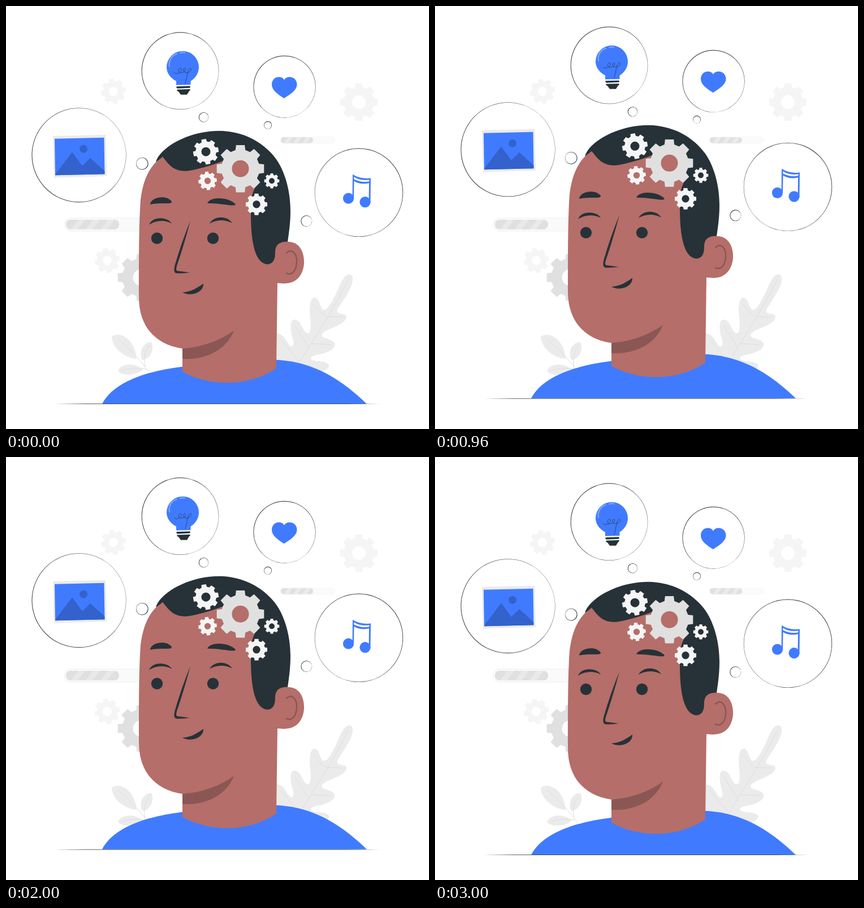
Write an HTML page that moves like this. It is 748x748 px and loops after 3.04 s.

```html
<!DOCTYPE html>
<html lang="en">
<head>
<meta charset="utf-8">
<title>Thinking head</title>
<style>
  html, body { margin: 0; width: 100%; height: 100%; overflow: hidden; background: #fff; }
  svg { display: block; width: 100vw; height: 100vh; }
  .ink { fill: #263238; }
  .blue { fill: #407bff; }
  .skin { fill: #b56e69; }
  .shade { fill: #8a5754; }
  .pale { fill: #f5f5f5; }
  .mid { fill: #e0e0e0; }
  .leaf { fill: #ebebeb; }
  .vein { fill: none; stroke: #dedede; stroke-width: 1; }
</style>
</head>
<body>
<svg viewBox="0 0 748 748" xmlns="http://www.w3.org/2000/svg">
  <defs>
    <clipPath id="clipLarge"><rect x="106" y="378" width="94" height="17" rx="8"/></clipPath>
    <clipPath id="clipSmall"><rect x="486" y="232" width="57" height="10.500" rx="5"/></clipPath>
  </defs>

  <g id="backGears"></g>

  <g>
    <rect x="103" y="375" width="170" height="23" rx="11" fill="#fafafa" stroke="#f0f0f0"/>
    <g clip-path="url(#clipLarge)">
      <rect class="mid" x="106" y="378" width="94" height="17"/>
      <path class="leaf" fill-opacity=".8" d="M115 395l13-17h12l-13 17zM141 395l13-17h12l-13 17zM167 395l13-17h12l-13 17z"/>
    </g>
    <rect x="485" y="230.500" width="97" height="13.500" rx="6.700" fill="#fafafa"/>
    <g clip-path="url(#clipSmall)">
      <rect class="mid" x="486" y="232" width="57" height="11"/>
      <path class="leaf" d="M491 243l8-11h8l-8 11zM507 243l8-11h8l-8 11zM523 243l8-11h8l-8 11z"/>
    </g>
  </g>

  <g>
    <path class="leaf" d="M231 624C207 622 187 602 187 585C196 575 228 584 231 624Z
      M241 626C234 612 242 595 257 594C263 606 256 625 241 626Z
      M242 643C226 629 203 633 198 645C204 655 230 654 242 643Z"/>
    <path class="vein" d="M253 647C238 628 218 604 197 589M246 639C242 622 247 609 254 600M248 642C232 639 216 641 205 645"/>
    <path class="leaf" d="M470 650V578C488 577 492 585 499 597C506 607 511 600 507 588C502 572 502 558 508 555
      C521 552 523 572 531 578C539 582 540 568 538 553C536 535 537 518 544 516C555 514 554 533 561 537
      C569 539 576 523 583 510C592 491 596 477 605 475C612 474 614 479 613 486C611 500 597 519 587 535
      C582 545 591 543 600 546C604 550 601 556 595 560C581 570 560 573 558 582C558 589 575 587 581 596
      C584 604 572 612 559 615C545 618 537 619 540 625C546 630 564 626 571 634C573 643 560 646 545 650Z"/>
    <path class="vein" d="M606 482C583 530 550 580 514 638M565 549L543 527M535 603L511 566M566 549L594 550M540 597L575 599M518 628L486 590"/>
  </g>

  <g id="floating">
    <g id="bubbles"></g>

    <g>
      <path class="blue" d="M301 140V133C291 128 284 119 284 108.500A28.500 28.500 0 0 1 341 108.500C341 119 335 128 326.500 133V139.500Z"/>
      <path d="M289 107C287 96 294 87 302 85M308 83.500Q312 82 316 83" fill="none" stroke="#7aa2ff" stroke-width="2.400" stroke-linecap="round"/>
      <path d="M317 138L321 119C323 108 329 109 327 114C324 119 314 121 314 113C316 107 320 112 316 116C309 121 303 118 306 112C309 108 313 113 308 117Q302 122 297 118" fill="none" stroke="#263238" stroke-width=".65"/>
      <path class="ink" d="M302 142.500L325 141.800Q327 143 325 145L303 146Q300 144 302 142.500ZM303 148L325 147.300Q327 149 324 150.500L320 157H309L305 151.500Q301 150 303 148Z"/>
    </g>

    <path class="blue" d="M491.800 163.500C480 156 470 149 470 139C470 125 487 122 492 131C497 122 514.500 125 514.500 139C514.500 149 503 156 491.800 163.500Z"/>

    <path fill="#ebebeb" d="M83 230L176.500 228L178 301L85 304Z"/>
    <path class="blue" d="M86 235L173.500 233L174.500 297.500L87 299.500Z"/>
    <g fill="#3362cc">
      <circle cx="137" cy="253" r="7"/>
      <path d="M87 299.500V298L117 258.500L135 283L149 269L174.400 292V297.500Z"/>
    </g>

    <g class="blue">
      <circle cx="605.500" cy="340.500" r="9.600"/>
      <circle cx="635" cy="347" r="9.600"/>
      <path d="M613 298Q627 307 645 304.500L644.500 348H641.500L642 313.500Q627 317 615.500 310L615 341H612.500ZM615.300 302.500V306.500Q628 313 642.200 310.500L642.400 307.500Q627 310 615.300 302.500Z" fill-rule="evenodd"/>
    </g>

    <path class="blue" d="M170 704C187 670 238 647 312 638L478 626C537 629 585 653 638 704Z"/>

    <path class="skin" d="M277 267C254 281 242 309 238 343C235 385 235 445 235 515C235 566 263 599 312 606V647C360 674 430 674 478 641L480 490L490 400L460 270L380 240Z"/>
    <path class="shade" d="M312 606C350 603 380 591 403 574C391 607 354 627 312 624Z"/>
    <path class="ink" d="M265 276C271 253 319 221 378 221C421 222 455 241 477 270C495 295 503 331 503 362C503 386 500 403 497 425L476 437C476 451 470 457 462 457C440 455 433 417 433 368C430 350 434 336 440 322L438 268L398 267C387 275 338 291 318 292C294 293 285 276 277 267Q271 272 265 276Z"/>
    <path class="skin" d="M476 440C475 423 482 417 498 417C518 417 528 434 527 456C525 479 511 492 490 491L478 490Z"/>
    <path d="M496 437C506 428 515 439 514 454C513 470 505 477 496 473" fill="none" stroke="#8a5754" stroke-width="2.400" stroke-linecap="round"/>

    <g class="ink">
      <path d="M255 350C258 337 285 334 293 346C294 352 277 347 255 351Z"/>
      <path d="M356 349C361 336 395 338 406 351C404 356 384 349 356 349Z"/>
      <path d="M253 387C259 371 287 373 293 385C281 378 265 379 253 387Z"/>
      <path d="M360 385C368 370 392 371 400 384C386 377 372 378 360 385Z"/>
      <circle cx="267" cy="411" r="10.200"/>
      <circle cx="366" cy="411" r="10.200"/>
      <path d="M326 380Q315 422 302 460C300 467 301 469 306 469L325 471.500Q314 473 303 473C296 473 297 466 298.500 459Q310 419 326 380Z"/>
      <path d="M312 506.500C328 506 339 498 349 491C350 507 326 515 312 506.500Z"/>
    </g>
    <g id="headGears"></g>
  </g>

  <path id="floor" class="ink" d="M85 703.700L140 703.300H600L662 703.700L600 704.100H140Z"/>
</svg>

<script>
  const LOOP = 3040, FPS = 24, LAST_STEP = 72;
  const LIFT = 15, LEAD = 25, REST = .2;
  const byId = id => document.getElementById(id);

  function circlePath(x, y, r) {
    return `M${x - r} ${y}a${r} ${r} 0 1 0 ${2 * r} 0a${r} ${r} 0 1 0 ${-2 * r} 0Z`;
  }

  function gear(cls, x, y, r, hole, turn = 0) {
    const teeth = 8, pitch = 2 * Math.PI / teeth, root = r * .8;
    const points = [];
    for (let i = 0; i < teeth; i++) {
      const mid = i * pitch + turn * Math.PI / 180;
      for (const [radius, shift] of [[root, -.33], [r, -.23], [r, .23], [root, .33]]) {
        const a = mid + shift * pitch;
        points.push(`${(x + radius * Math.cos(a)).toFixed(2)} ${(y + radius * Math.sin(a)).toFixed(2)}`);
      }
    }
    return `<path class="${cls}" fill-rule="evenodd" d="M${points.join('L')}Z${circlePath(x, y, hole)}"/>`;
  }

  // A ring whose line thins out towards the given angle.
  function bubble(x, y, r, thinAngle) {
    const a = thinAngle * Math.PI / 180, inner = r - .65;
    const ring = circlePath(x, y, r) + circlePath(x + .35 * Math.cos(a), y + .35 * Math.sin(a), inner);
    return `<circle cx="${x}" cy="${y}" r="${inner}" fill="#fff"/>
      <path class="ink" fill-rule="evenodd" d="${ring}"/>`;
  }

  byId('backGears').innerHTML =
    gear('pale', 190, 151, 22.5, 8, -10) +
    gear('pale', 624, 170, 33.5, 12) +
    gear('pale', 179, 450, 22.5, 8, -10) +
    gear('mid', 239, 480, 42, 14.5);

  byId('headGears').innerHTML =
    gear('mid', 414.5, 288, 42.5, 15) +
    gear('pale', 353.5, 258, 22.8, 8, -10) +
    gear('pale', 356.5, 309.5, 16.5, 5.7, -6) +
    gear('pale', 470, 309.5, 13.5, 5) +
    gear('pale', 443, 351, 19.3, 6.7);

  byId('bubbles').innerHTML =
    bubble(308, 115, 68.3, 40) + bubble(492.5, 143, 55, 60) +
    bubble(129, 264, 83.5, -35) + bubble(624, 330, 78.2, 120) +
    bubble(349.5, 197, 8.7, 40) + bubble(463, 211, 7, 100) +
    bubble(240.8, 279, 10.8, 200) + bubble(531.3, 380.5, 10, 20);

  function bob(time, period) {
    const phase = (time + LEAD) % period / period;
    return REST - LIFT * (1 - Math.abs(1 - 2 * phase));
  }

  function shift(id, y) {
    byId(id).setAttribute('transform', `translate(0 ${y.toFixed(3)})`);
  }

  function render(ms) {
    const step = Math.min(LAST_STEP, Math.floor((ms % LOOP + 4) * FPS / 1000));
    const time = step * 1000 / FPS;
    shift('floating', bob(time, 1500));
    shift('floor', bob(time, 3000));
  }

  const start = performance.now();
  function tick() {
    render(performance.now() - start);
    requestAnimationFrame(tick);
  }
  tick();
</script>
</body>
</html>
```
